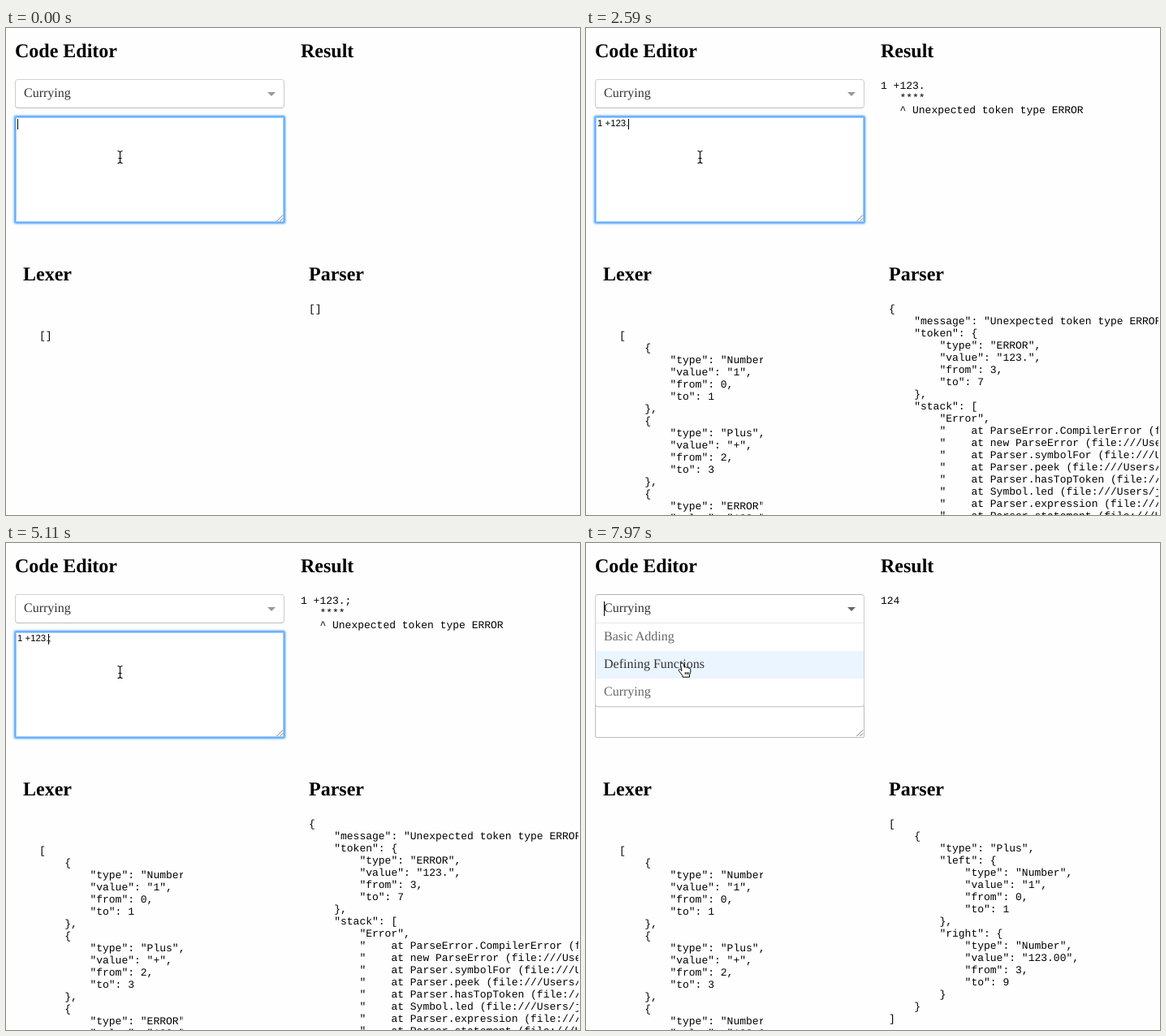
These frames come from a looping animation (707 px wide and 600 px high, 8 s). An HTML page:

```html
<!DOCTYPE html>
<html lang="en">
<head>
<meta charset="utf-8">
<title>Code Editor</title>
<style>
  html, body { margin: 0; width: 100%; height: 100%; overflow: hidden; background: #fefefe; }
  body { position: relative; font: 16px "Liberation Serif", serif; color: #000; text-rendering: geometricPrecision; }
  div, pre, h2, svg { position: absolute; margin: 0; box-sizing: border-box; }
  h2 { font-size: 24px; line-height: 28px; white-space: nowrap; }
  pre { font: 13px/15px "Liberation Mono", monospace; overflow: hidden; }
  #lower { left: 0; width: 705px; height: 600px; }
  #result { left: 363px; top: 64px; width: 342px; }
  #lexer { left: 41px; top: 372px; width: 177px; }
  #parser { left: 373px; top: 339px; width: 332px; }

  #area { left: 11px; top: 109px; width: 332px; height: 131px; border: 1px solid #bdbdbd; background: #fff; border-radius: 2px; }
  #area.focus { border-color: #64adf8; box-shadow: 0 0 0 1px #7ab8fa, 0 0 2px 2px #a9d2fd, inset 0 0 0 1px #a3cefc; }
  #code { left: 14px; top: 112px; font: 11.4px/13px "Liberation Sans", sans-serif; white-space: pre; }
  #code i { position: absolute; top: 0; width: 1px; height: 13px; margin-left: -.4px; background: #000; }
  #grip { left: 332px; top: 229px; }

  #select { left: 11px; top: 63px; width: 332px; height: 36px; padding-left: 10px; line-height: 34px; color: #333;
    background: #fff; border: 1px solid; border-color: #d2d2d2 #ccc #bcbcbc; border-radius: 4px; }
  #select b { position: absolute; left: 310px; top: 15px; border: 5px solid transparent; border-top-color: #999; border-bottom: 0; }
  #select.hover b { border-top-color: #666; }
  #select.open { border-color: #b3b3b3 #ccc #d9d9d9; border-radius: 4px 4px 0 0; }
  #select i { display: none; position: absolute; left: 10px; top: 8px; width: 1px; height: 18px; background: #000; }
  #select.open i { display: block; }
  #menu { left: 11px; top: 98px; width: 332px; height: 104px; background: #fff; border: 1px solid #ccc; border-top-color: #e6e6e6;
    border-radius: 0 0 4px 4px; box-shadow: 0 1px 0 rgba(0, 0, 0, .06); overflow: hidden; }
  #menu p { margin: 0; padding-left: 10px; line-height: 34px; color: #666; }
  #menu p.on { background: #ebf5ff; color: #333; }
  #mouse { left: 0; top: 0; overflow: visible; }
  [hidden] { display: none; }
</style>
</head>
<body>
<h2 style="left:11px;top:15px">Code Editor</h2>
<h2 style="left:363px;top:15px">Result</h2>
<pre id="result"></pre>
<div id="lower">
  <h2 style="left:21px;top:290px">Lexer</h2>
  <h2 style="left:373px;top:290px">Parser</h2>
  <pre id="lexer"></pre>
  <pre id="parser"></pre>
</div>
<div id="area"></div>
<div id="code"><span id="before"></span><i id="caret"></i><span id="after"></span></div>
<svg id="grip" width="10" height="10" fill="none" stroke="#777"><path d="M1.5 9 9 1.5M5.5 9 9 5.5"/></svg>
<div id="select">Currying<b></b><i></i></div>
<div id="menu"><p>Basic Adding</p><p>Defining Functions</p><p>Currying</p></div>
<svg id="mouse" width="1" height="1">
  <g id="beam" fill="none">
    <path id="bar" stroke="#fff" stroke-width="2.6" d="M-3-7.5q3 0 3 2q0-2 3-2M0-6V6M-3 7.5q3 0 3-2q0 2 3 2M-2 1.5H2"/>
    <use href="#bar" id="ink"/>
    <path stroke="#000" stroke-width="1.1" d="M-3-7.5q3 0 3 2q0-2 3-2M0-6V6M-3 7.5q3 0 3-2q0 2 3 2M-2 1.5H2"/>
  </g>
  <path id="arrow" fill="#000" stroke="#fff" d="M0 0V15L3.5 11.8 6 17.5 8.5 16.5 6 11H10.5Z"/>
  <path id="hand" fill="#fff" stroke="#000" stroke-linejoin="round" d="M-4.5-7.5c1.4-1.3 2.6-.6 3 .7l1.2 4c.9-.9 2.2-.7 2.7.4c1-.7 2.2-.4 2.5.7c1.3-.4 2.3.3 2.4 1.7c.2 3-.3 4.500-1.300 6.500v2.700h-8.500v-1.500C-4.500 5.500-5.500 3-7.200 1.300c-.8-1.200.8-2.400 2.200-1.200l1.500 1.400L-5-5.500Q-5.200-6.800-4.500-7.500ZM.8 3V6M2.800 3V6M4.700 3V6"/>
</svg>
<script>
const LOOP = 8000;
const $ = id => document.getElementById(id);
const json = value => JSON.stringify(value, null, 4);

// [time, text with "|" as caret, text the panels still show if they lag]
const typing = [
  [0, '|'], [270, ''], [630, '1|'], [800, '1 |'], [1250, '1 '], [1790, '1 +|'],
  [2240, '1 +12|'], [2330, '1 +123|'], [2590, '1 +123.|'],
  [3130, '1 +123|', '1 +123.'], [3220, '1 +123|'], [3760, '1 +123;|'], [4210, '1 +123;'],
  [4480, '1 +123|;'], [5020, '1 +123.|;', '1 +123;'], [5110, '1 +123.|;'],
  [5560, '1 +123.;'], [6100, '1 +123.|;'], [6280, '1 +123.0|;'],
  [6540, '1 +123.00|;'], [6990, '1 +123.00;']
];

// [time, pointer, x, y, highlighted option]
const moves = [
  [0, 'beam', 140.5, 159], [6990, 'beam', 139.5, 147], [7080, 'beam', 131.5, 120],
  [7170, 'arrow', 121, 92], [7260, 'arrow', 118, 87], [7350, 'arrow', 118, 87, 2],
  [7440, 'beam', 118.5, 87, 2], [7710, 'beam', 118.5, 93, 2], [7800, 'hand', 121.5, 116, 0],
  [7890, 'hand', 121.5, 139, 1], [7970, 'hand', 121.5, 156, 1]
];

function lex(code) {
  return [...code.matchAll(/\d+\.(?!\d)|\d+(\.\d+)?|\+|;/g)].map(({ 0: value, index: from }) => ({
    type: value === '+' ? 'Plus' : value === ';' ? 'SemiColon' : value.endsWith('.') ? 'ERROR' : 'Number',
    value, from, to: from + value.length
  }));
}

const file = 'file:///Users/jonasbrell/Documents/compiler/src/index.js:12:9';
const trace = names => names.map(n => '    at ' + (n ? `${n} (${file})` : file));
const parsing = ['Parser.statement', 'Parser.statements', 'Parser.parse'];
const compileTail = [...parsing, 'exports.default', 'Object.compile', '', 'exports.default', 'renderOutput'];
const parseTail = [...parsing, 'Object.exports.default [as default]', '', 'exports.default', 'renderOutput'];

function failure(type, message, head) {
  const report = tail => json({ message, stack: [`${type}: ${message}`, ...trace([...head, ...tail])] });
  return [report(compileTail), report(parseTail)];
}

// Returns the texts of the result and parser panels
function compile(code, tokens) {
  if (!tokens.length) return ['', '[]'];
  const token = tokens.find(t => t.type === 'ERROR');
  if (token) {
    const message = 'Unexpected token type ERROR';
    const pad = ' '.repeat(token.from);
    const head = ['ParseError.CompilerError', 'new ParseError', 'Parser.symbolFor', 'Parser.peek',
      'Parser.hasTopToken', 'Symbol.led', 'Parser.expression'];
    return [
      `${code}\n${pad}${'*'.repeat(token.value.length)}\n${pad}^ ${message}`,
      json({ message, token, stack: ['Error', ...trace([...head, ...parsing])] })
    ];
  }
  if (tokens.at(-1).type === 'Plus')
    return failure('Error', 'Unexpected end of file', ['Symbol.led', 'Parser.expression']);
  if (!code.endsWith(';'))
    return failure('TypeError', "Cannot read property 'type' of undefined", ['Parser.advance']);
  const [left, , right] = tokens;
  return [String(+left.value + +right.value), json([{ type: 'Plus', left, right }])];
}

function showTyping([, text, shown]) {
  const [before, after = ''] = text.split('|');
  $('before').textContent = before;
  $('after').textContent = after;
  $('caret').hidden = !text.includes('|');

  const code = shown ?? before + after;
  const tokens = lex(code);
  const [result, tree] = compile(code, tokens);
  $('result').textContent = result;
  $('lexer').textContent = json(tokens);
  $('parser').textContent = tree;
  $('lower').style.top = Math.max(0, result.split('\n').length * 15 - 164) + 'px';
}

function showMove([time, pointer, x, y, option]) {
  const open = option !== undefined;
  for (const id of ['beam', 'arrow', 'hand']) $(id).style.display = id === pointer ? '' : 'none';
  $('mouse').style.transform = `translate(${x}px, ${y}px)`;
  $('select').className = (open ? 'open ' : '') + (pointer === 'beam' && !open ? '' : 'hover');
  $('area').className = open ? '' : 'focus';
  $('menu').hidden = !open;
  [...$('menu').children].forEach((p, i) => p.className = i === option ? 'on' : '');
}

function player(steps, show) {
  let current;
  return t => {
    const step = steps.findLast(s => s[0] <= t);
    if (step !== current) show(current = step);
  };
}

const players = [player(typing, showTyping), player(moves, showMove)];
const start = performance.now();
function tick() {
  const t = (performance.now() - start) % LOOP;
  players.forEach(play => play(t));
  requestAnimationFrame(tick);
}
tick();
</script>
</body>
</html>
```
